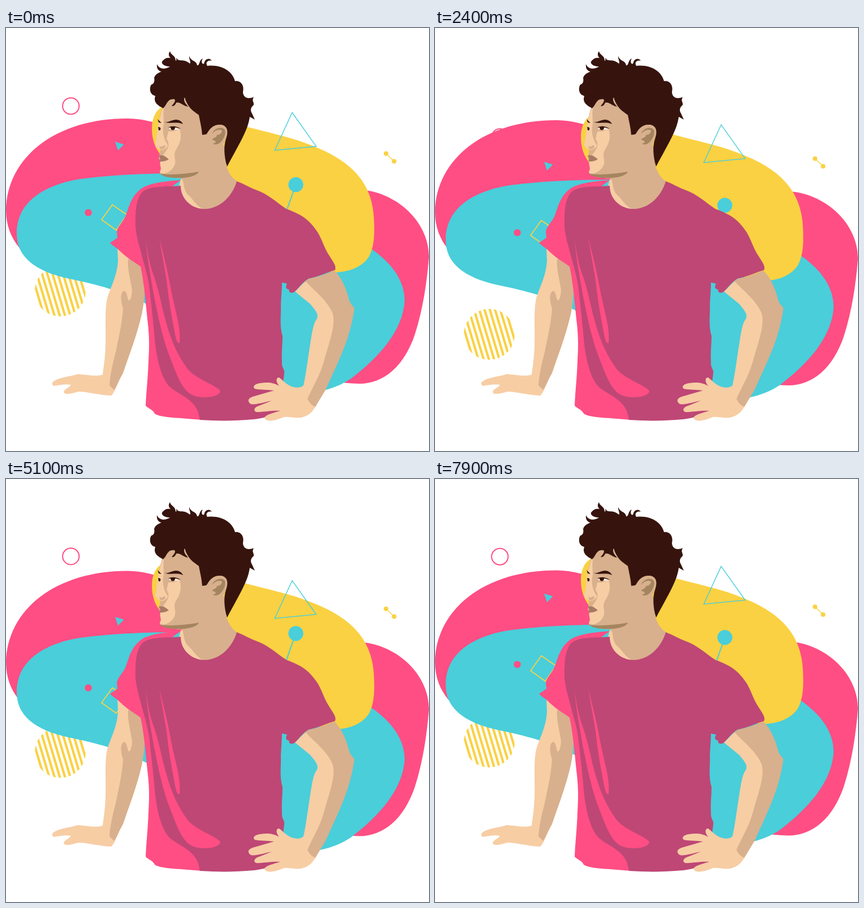
Write an HTML page with a canvas that moves like this. It is 748 px wide and 748 px high and loops after 8000 ms.

```html
<!DOCTYPE html>
<html lang="en">
<head>
<meta charset="utf-8">
<title>Floating shapes</title>
<style>
html, body { margin: 0; width: 100%; height: 100%; overflow: hidden; background: #fff; }
canvas { display: block; }
</style>
</head>
<body>
<canvas id="stage" width="748" height="748"></canvas>
<script>
const ctx = document.getElementById('stage').getContext('2d');
const LOOP = 8000, STEP = 100, DRIFT = 18.9;
const PINK = '#ff4e84', TEAL = '#49ceda', YELLOW = '#fad142';
const PLUM = '#be4775', LIGHT = '#f7cda4', TAN = '#d8b08d', SHADE = '#a5855f', HAIR = '#36140d';

// Straight runs between [time, offset] stops.
function run(t, stops) {
  let i = 1;
  while (i < stops.length - 1 && t > stops[i][0]) i++;
  const [t0, a] = stops[i - 1], [t1, b] = stops[i];
  return a + (b - a) * (t - t0) / (t1 - t0);
}
const swing = (t, period) => 1 - Math.abs(1 - 2 * (t % period) / period);

const SHAKE = [[0, 0], [1320, 1], [2430, .14], [3920, .99], [5180, .08], [6660, 1], [8000, 0]];
const RING = [[0, 0], [2600, 59.5], [5750, -17], [8000, 0]];
const STRIPES = [[0, 0], [2340, 78], [5950, 0], [8000, 0]];
const SQUARE = [[0, 0], [1680, 52], [3220, 0], [5140, 58], [6750, 0], [8000, 0]];
const OUTLINE = [[0, 0], [1400, 70], [3030, -9], [4470, 61], [5880, -8], [7030, 48], [8000, 0]];
const PIN = [[0, 0], [1980, 61], [4000, -57], [6320, 55], [8000, 0]];

const blobs = {
  pink: new Path2D(`M0 322C2 228 88 160 215 160C330 161 400 280 520 285
    C560 283 600 282 637 287C700 297 748 348 748 405C744 450 738 495 723 542
    C704 598 668 629 625 629C560 628 470 600 380 560L240 440C190 440 120 434 85 426
    C35 412 0 375 0 322Z`),
  teal: new Path2D(`M19 362C20 310 62 280 125 268C180 260 240 257 320 257C420 300 540 330 600 365
    C660 392 705 432 705 482C702 535 660 582 610 620C595 630 580 636 565 640
    C535 648 500 650 470 642L300 515C275 500 250 489 240 484C210 467 160 453 110 443
    C52 430 18 405 19 362Z`),
  yellow: new Path2D(`M258 178C258 160 264 147 275 140C310 130 370 157 427 175
    C463 185 500 192 528 203C604 230 651 268 651 346C652 378 648 392 642 404
    C630 423 605 432 582 432C500 428 430 340 380 270L290 240C269 224 258 205 258 178Z`)
};

const figure = [
  // arm on the left
  [LIGHT, `M197 388L198 412C196 440 186 455 179 478C174 500 177 530 176 562C175 588 172 602 171 613
    C160 617 142 613 127 612C119 615 100 617 89 622C81 626 80 628 84 633C95 631 106 629 115 631
    C112 636 102 639 102 644C105 650 117 646 128 643C145 643 162 649 186 650
    C193 644 196 630 207 610C217 580 231 545 240 506C245 480 248 445 239 418Z`],
  [TAN, `M216 408C214 425 221 448 223 464C222 474 221 481 217 482C214 477 214 464 208 465
    C201 470 203 483 207 496C205 525 199 548 194 573C188 596 184 615 183 632L191 640
    C197 632 199 623 207 610C217 580 231 545 240 506C245 485 248 445 240 416Z`],
  // neck
  [TAN, 'M309 255L342 235L387 210L390 245C395 260 402 267 410 272L400 305L355 325L318 312Z'],
  [LIGHT, 'M309 267C316 266 312 284 321 294C332 303 334 313 350 321L318 314L306 280Z'],
  // shirt
  [PINK, `M309 269C280 271 253 274 238 285C221 298 217 318 212 331C207 344 196 352 196 361L197 371
    L184 380C191 387 195 388 200 393C215 408 228 414 238 422C244 450 247 485 250 515
    C253 540 254 558 252 588C251 620 248 642 247 668C253 674 259 674 263 682
    C275 690 310 689 345 693L345 660L258 425L280 290Z`],
  [PLUM, `M309 279C285 281 255 278 241 290C228 305 229 330 229 352C231 372 236 385 239 398
    C243 415 249 430 253 455C257 490 261 525 264 560C268 590 275 620 290 635
    C307 649 333 657 340 680L343 693C375 695 405 695 438 692C463 689 475 684 488 676
    L489 635L492 611C494 604 487 602 488 590C487 572 489 560 489 545C483 525 487 505 486 490
    C487 470 488 460 488 450L497 452C493 460 496 461 501 463C499 468 506 470 511 466
    C519 458 525 449 535 443C552 440 568 432 582 428C585 420 577 412 572 403
    C563 390 559 374 551 361C538 342 527 331 496 320C478 308 462 293 444 287
    C430 282 420 275 408 271C401 296 379 320 351 320C328 320 309 302 309 280Z`],
  [PINK, `M247 372C249 392 254 420 262 440C272 470 275 492 283 520C292 553 304 580 322 604
    C338 622 373 632 379 642C377 653 350 655 335 651C311 645 302 612 289 580
    C276 546 269 510 261 470C255 435 249 405 247 372Z`],
  [PINK, `M271 371C277 395 285 425 291 458C298 498 310 528 307 557C301 560 299 540 296 526
    C291 500 287 475 284 446Z`],
  // arm on the right, below the sleeve
  [TAN, `M528 449C532 445 535 443 541 442C556 439 570 433 581 429C592 440 601 458 606 478
    C608 487 613 491 616 495C614 515 606 545 598 565
    C588 590 575 618 565 640C559 650 553 660 547 670L530 665L540 560L560 510Z`],
  [LIGHT, `M511 466C519 459 523 453 530 448C545 465 566 479 577 503C585 523 570 560 562 590
    C555 615 543 633 533 656
    C537 664 542 668 547 670C541 680 533 687 521 689C510 690 500 687 491 688
    C482 692 468 697 460 693C453 688 459 684 485 677C470 676 450 680 442 679
    C436 675 440 670 450 667L470 659C455 662 440 667 433 665C426 660 428 655 436 652L474 641
    C460 639 446 640 440 638C435 634 440 629 450 628C463 626 473 627 483 633
    C476 624 478 618 483 618C490 623 495 630 505 634C515 637 522 636 526 632
    C530 615 533 590 537 565C541 540 543 522 550 514C554 505 544 496 538 488Z`],
  // face
  [TAN, `M278 136L300 120L345 135L370 185L387 210C385 235 360 255 335 263C312 268 290 266 274 259
    L272 254C276 248 271 242 273 236L270 230L273 216C266 211 263 208 265 201
    C267 190 269 177 270 166C272 155 274 146 278 136Z`],
  [LIGHT, `M276 144L280 138C277 150 279 158 279 169C276 180 278 194 284 204C290 209 281 215 274 216
    C265 211 262 208 265 201L270 166Z`],
  [LIGHT, `M287 183C295 183 302 182 307 178C311 190 309 202 302 213C294 224 301 231 299 240
    C295 252 285 258 273 258L272 254C277 248 271 243 273 237L287 232L278 224
    C286 215 291 206 284 196Z`],
  [SHADE, 'M272 257C287 261 318 258 341 254C338 262 319 266 302 265C288 265 277 263 272 257Z'],
  ['#a87963', 'M270 226C275 223 282 227 288 232C282 236 275 237 271 235L273 231Z'],
  [TAN, 'M271 208C276 212 278 207 281 207C284 211 280 214 273 215Z'],
  [HAIR, 'M279 166C286 168 292 163 300 162C306 162 311 165 313 170C304 165 291 170 279 166Z'],
  [HAIR, 'M268 161L275 168L270 167Z'],
  ['#fff3e6', 'M288 178C294 173 302 174 308 178C301 181 294 181 288 178Z'],
  [HAIR, 'M287 176C294 172 302 174 309 178C305 178 302 176 299 176C299 182 291 182 291 176Z'],
  [HAIR, 'M269 175C273 175 275 178 272 181L270 181Z'],
  // hair
  [HAIR, `M278 142C269 137 260 132 264 120C254 118 253 106 257 100C262 99 263 94 262 88
    C264 82 268 80 275 77C269 76 266 71 267 64C271 73 281 74 290 68C279 68 273 62 277 58
    C281 53 285 52 291 53C286 48 288 44 290 41C291 48 300 48 300 58C303 57 300 53 302 53
    C304 61 314 53 325 63C328 61 323 55 324 49C326 59 337 57 338 66C343 67 341 56 348 54
    C343 61 350 68 351 60C353 54 360 52 364 58C357 56 352 61 356 67C383 64 401 78 405 94
    C415 92 422 102 419 113C419 122 427 127 438 122C434 130 439 130 438 136C432 141 432 146 435 151
    L440 162L431 157C428 180 415 200 391 245C385 226 385 207 389 196C395 180 385 169 371 172
    C361 175 358 185 354 188L347 189C346 176 343 165 341 154C336 149 323 145 316 123
    C312 130 321 137 322 139C313 138 308 130 301 132C300 135 297 139 293 138
    C296 134 301 129 298 126C289 125 286 130 282 137Z`],
  // ear
  [TAN, 'M355 188C360 176 370 170 381 171C394 174 393 187 388 197C386 210 371 214 363 207Z'],
  [SHADE, `M364 187C369 177 381 173 387 180C389 186 386 195 381 200C376 207 368 207 366 204
    C373 204 372 199 365 198C364 194 373 195 373 189C379 190 382 184 382 181
    C375 178 370 182 364 187Z`]
].map(([color, d]) => [color, new Path2D(d)]);

function shape(color, path, dy = 0) {
  ctx.save();
  ctx.translate(0, dy);
  ctx.fillStyle = color;
  ctx.fill(path);
  ctx.restore();
}
function dot(color, x, y, r) {
  ctx.fillStyle = color;
  ctx.beginPath();
  ctx.arc(x, y, r, 0, Math.PI * 2);
  ctx.fill();
}
function poly(points, dy, color, width) {
  ctx.beginPath();
  for (const [x, y] of points) ctx.lineTo(x, y + dy);
  ctx.closePath();
  if (width) {
    ctx.strokeStyle = color;
    ctx.lineWidth = width;
    ctx.stroke();
  } else {
    ctx.fillStyle = color;
    ctx.fill();
  }
}
function stripes(y) {
  ctx.save();
  ctx.translate(96, y);
  ctx.beginPath();
  ctx.arc(0, 0, 45, 0, Math.PI * 2);
  ctx.clip();
  ctx.rotate(-.29);
  ctx.fillStyle = YELLOW;
  for (let i = -5; i < 5; i++) ctx.fillRect((i + .5) * 8.9 - 2.1, -46, 4.2, 92);
  ctx.restore();
}

function draw(t) {
  const shake = run(t, SHAKE), slow = swing(t, LOOP);
  ctx.fillStyle = '#fff';
  ctx.fillRect(0, 0, 748, 748);

  ctx.strokeStyle = PINK;
  ctx.lineWidth = 2;
  ctx.beginPath();
  ctx.arc(114.7, 138 + run(t, RING), 14.6, 0, Math.PI * 2);
  ctx.stroke();
  stripes(465 + run(t, STRIPES));

  shape(PINK, blobs.pink, shake * DRIFT);
  shape(TEAL, blobs.teal, slow * DRIFT);
  shape(YELLOW, blobs.yellow, swing(t, LOOP / 2) * DRIFT);

  poly([[193, 201], [208.5, 206], [198, 216.5]], slow * 59, TEAL);
  dot(PINK, 145.5, 326.5 + slow * 59, 6.2);
  poly([[188, 312.5], [169, 339], [195, 357.5], [214, 330.5]], run(t, SQUARE), YELLOW, 1.8);
  poly([[506, 149.5], [548.5, 209.3], [475.3, 216.3]], run(t, OUTLINE), TEAL, 1.4);

  const pin = 277 + run(t, PIN);
  poly([[512.5, 0], [479.5, 93]], pin, TEAL, 2);
  dot(TEAL, 512.5, pin, 13.2);
  dot(TEAL, 480, pin + 93, 15);

  const bar = 222 + shake * 54.5;
  poly([[672, 0], [686.3, 13.7]], bar, YELLOW, 1.4);
  dot(YELLOW, 672, bar, 4);
  dot(YELLOW, 686.3, bar + 13.7, 4);

  for (const [color, path] of figure) shape(color, path);
}

const start = performance.now();
function tick() {
  const t = (performance.now() - start) % LOOP;
  draw(Math.floor(t / STEP) * STEP);
  requestAnimationFrame(tick);
}
tick();
</script>
</body>
</html>
```
